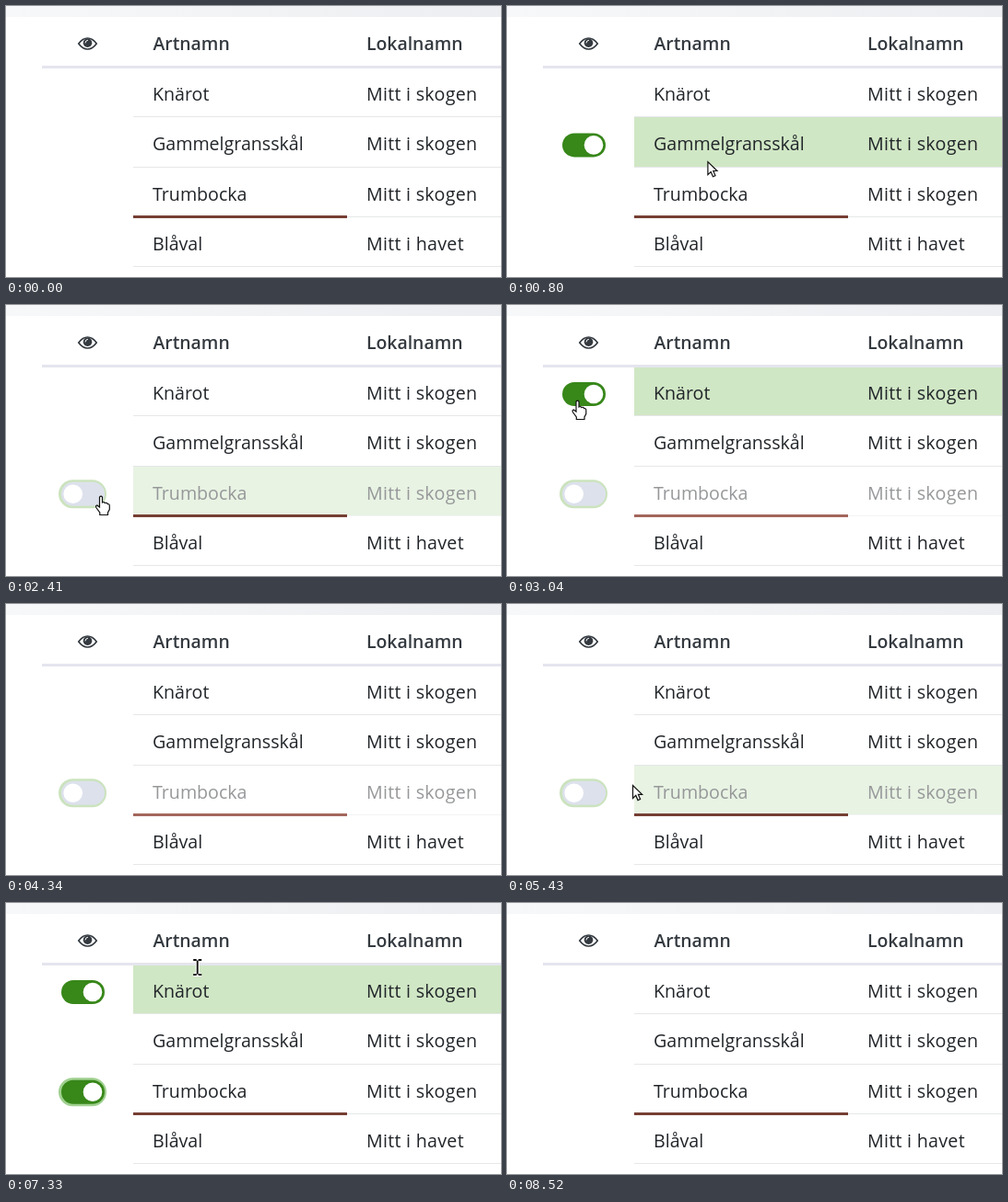
Animation of 537 by 295 pixels, one loop 8.6 s. Source, as an HTML page:

```html
<!DOCTYPE html>
<html lang="sv">
<head>
<meta charset="utf-8">
<title>Artlista</title>
<style>
html, body { margin: 0; width: 100%; height: 100%; overflow: hidden; background: #fff; }
svg { display: block; width: 100%; height: 100%; }
text { font: 19.6px "Open Sans", "Noto Sans", sans-serif; fill: #212529; }
.head { font-size: 19.4px; font-weight: 600; fill: #343a40; }
.place { letter-spacing: .3px; }
</style>
</head>
<body>
<svg viewBox="0 0 537 295">
  <defs>
    <linearGradient id="band">
      <stop offset="0" stop-color="#f7f8f9"/>
      <stop offset="1" stop-color="#eceef1"/>
    </linearGradient>
  </defs>
  <rect width="537" height="295" fill="#fff"/>
  <rect width="537" height="12" fill="url(#band)"/>
  <g id="table"></g>
  <g transform="translate(88.5 41)">
    <path d="M-9.7 0Q-5.4-6 0-6T9.7 0Q5.4 6 0 6T-9.7 0Z" fill="#fff" stroke="#343a40" stroke-width="1.7"/>
    <circle cy="-.8" r="4.8" fill="#343a40"/>
    <path d="M-2.5-1Q-2.4-3.5 0-3.7" fill="none" stroke="#fff" stroke-linecap="round"/>
  </g>
  <text class="head" x="159.5" y="48">Artnamn</text>
  <text class="head" x="391" y="48">Lokalnamn</text>
  <rect x="39" y="65" width="498" height="3" fill="#e4e5ee"/>
  <g id="pointer">
    <path id="arrow" d="M.5.5V14.5L3.8 11.4 6 16.6 8.6 15.5 6.4 10.4H10.6Z" fill="#fff" stroke="#111" stroke-width="1.2"/>
    <path id="hand" d="M-1.5 1.2Q0-1 1.5 1.2V7Q3.4 5.8 4.4 7.6 6.2 6.6 7.1 8.6 9.3 8.2 9.3 10.5V14.5L7.5 18V20.5H-1.2V18L-5 12.8Q-6.2 10.4-4.3 10L-1.5 12Z" fill="#fff" stroke="#111" stroke-width="1.2"/>
    <g id="beam" fill="none">
      <path d="M-4-8H4M-4 8H4M0-8V8" stroke="#fff" stroke-width="4"/>
      <path d="M-4.5-8H-1M1-8H4.5M-4.5 8H-1M1 8H4.5M0-7.5V7.5" stroke="#111" stroke-width="1.9"/>
    </g>
  </g>
</svg>
<script>
const LOOP = 8600, CLICK_OFF = 1880, CLICK_ON = 6270, BLUR = 7750;
const PITCH = 54.4, CHOSEN = 2;
const $ = id => document.getElementById(id);

function add(parent, tag, attrs, text) {
  const node = document.createElementNS("http://www.w3.org/2000/svg", tag);
  for (const k in attrs) node.setAttribute(k, attrs[k]);
  if (text) node.textContent = text;
  return parent.appendChild(node);
}
const show = (node, on) => node.setAttribute("visibility", on ? "visible" : "hidden");

const edge = i => Math.round(66.8 + PITCH * i);
const baseline = i => Math.round(102.8 + PITCH * i);
const middle = i => 97 + PITCH * i;

const names = ["Knärot", "Gammelgransskål", "Trumbocka", "Blåval"];
const rows = names.map((name, i) => {
  const y = edge(i), height = edge(i + 1) - y;
  const body = add($("table"), "g", {});
  const fill = add(body, "rect", { x: 138, y, width: 399, height, fill: "#d0e7c5" });
  add(body, "rect", { x: 138, y: y + height - 1, width: 399, height: 1, fill: "#e6e7e9" });
  add(body, "text", { x: 159, y: baseline(i) }, name);
  add(body, "text", { class: "place", x: 391, y: baseline(i) }, i < 3 ? "Mitt i skogen" : "Mitt i havet");
  const toggle = add($("table"), "g", { transform: `translate(0 ${middle(i)})` });
  const ring = add(toggle, "rect", { x: 57, y: -15.5, width: 52, height: 31, rx: 15.5 });
  const track = add(toggle, "rect", { x: 60, y: -13, width: 47, height: 26, rx: 13 });
  const knob = add(toggle, "circle", { r: 10.3, fill: "#fff" });
  return { body, fill, toggle, ring, track, knob };
});
const mark = add($("table"), "rect", { x: 138, y: 228, width: 232, height: 3 });

// Each glide starts where the last one ended, unless it enters from outside
const glides = [
  { start: 100, end: 900, from: [262, 2], to: [211, 193] },
  { start: 1010, end: 1790, to: [103, 208] },
  { start: 2730, end: 3320, to: [50, 0], leaves: true },
  { start: 5130, end: 5430, from: [196, 4], to: [136, 197] },
  { start: 5430, end: 5980, to: [100, 207] },
  { start: 6910, end: 7750, to: [258, 6], power: 1.65, leaves: true }
];
glides.forEach((g, i) => g.from = g.from || glides[i - 1].to);

// The pointer moves in steps of about a tenth of a second
function pointerAt(t) {
  const g = glides.filter(g => g.start <= t).pop();
  if (!g || (g.leaves && t >= g.end)) return null;
  const length = g.end - g.start, steps = Math.round(length / 100);
  const u = Math.min(1, Math.floor((t - g.start) / length * steps + .01) / steps);
  const eased = 1 - (1 - u) ** (g.power || 1);
  const [x, y] = g.from.map((v, k) => v + (g.to[k] - v) * eased);
  return { x, y };
}

function pointerKind({ x, y }) {
  const near = (at, reach) => names.some((_, i) => Math.abs(y - at(i)) < reach);
  if (x > 58 && x < 110 && near(middle, 15)) return "hand";
  const overHead = y > 28 && y < 78;
  const overName = near(i => baseline(i) - 7, 12);
  return x > 159 && x < 244 && (overHead || overName) ? "beam" : "arrow";
}

const ramp = (t, start) => Math.min(1, Math.max(0, (t - start + 80) / 200));
const mix = (a, b, u) => `rgb(${a.map((v, i) => Math.round(v + (b[i] - v) * u))})`;

function draw(t) {
  const p = pointerAt(t);
  const hovered = p ? names.findIndex((_, i) => p.y >= edge(i) && p.y < edge(i + 1)) : -1;
  const off = ramp(t, CLICK_OFF) - ramp(t, CLICK_ON);
  const focus = t >= CLICK_OFF && t < BLUR;

  rows.forEach((row, i) => {
    const focused = focus && i === CHOSEN;
    const dim = i === CHOSEN ? off : 0;
    row.body.setAttribute("opacity", 1 - .53 * dim);
    show(row.fill, i === hovered);
    show(row.toggle, i === hovered || focused);
    row.ring.setAttribute("fill", focused ? mix([160, 208, 144], [203, 227, 190], dim) : "none");
    row.track.setAttribute("fill", mix([55, 135, 25], [221, 225, 236], dim));
    row.knob.setAttribute("cx", 94 - 21.3 * dim);
  });
  mark.setAttribute("fill", mix([118, 62, 51], [164, 102, 92], hovered === CHOSEN ? 0 : off));

  const kind = p && pointerKind(p);
  for (const id of ["arrow", "hand", "beam"]) show($(id), id === kind);
  if (p) $("pointer").setAttribute("transform", `translate(${p.x.toFixed(1)} ${p.y.toFixed(1)})`);
}

const begin = performance.now();
function tick() {
  draw((performance.now() - begin) % LOOP);
  requestAnimationFrame(tick);
}
tick();
</script>
</body>
</html>
```
